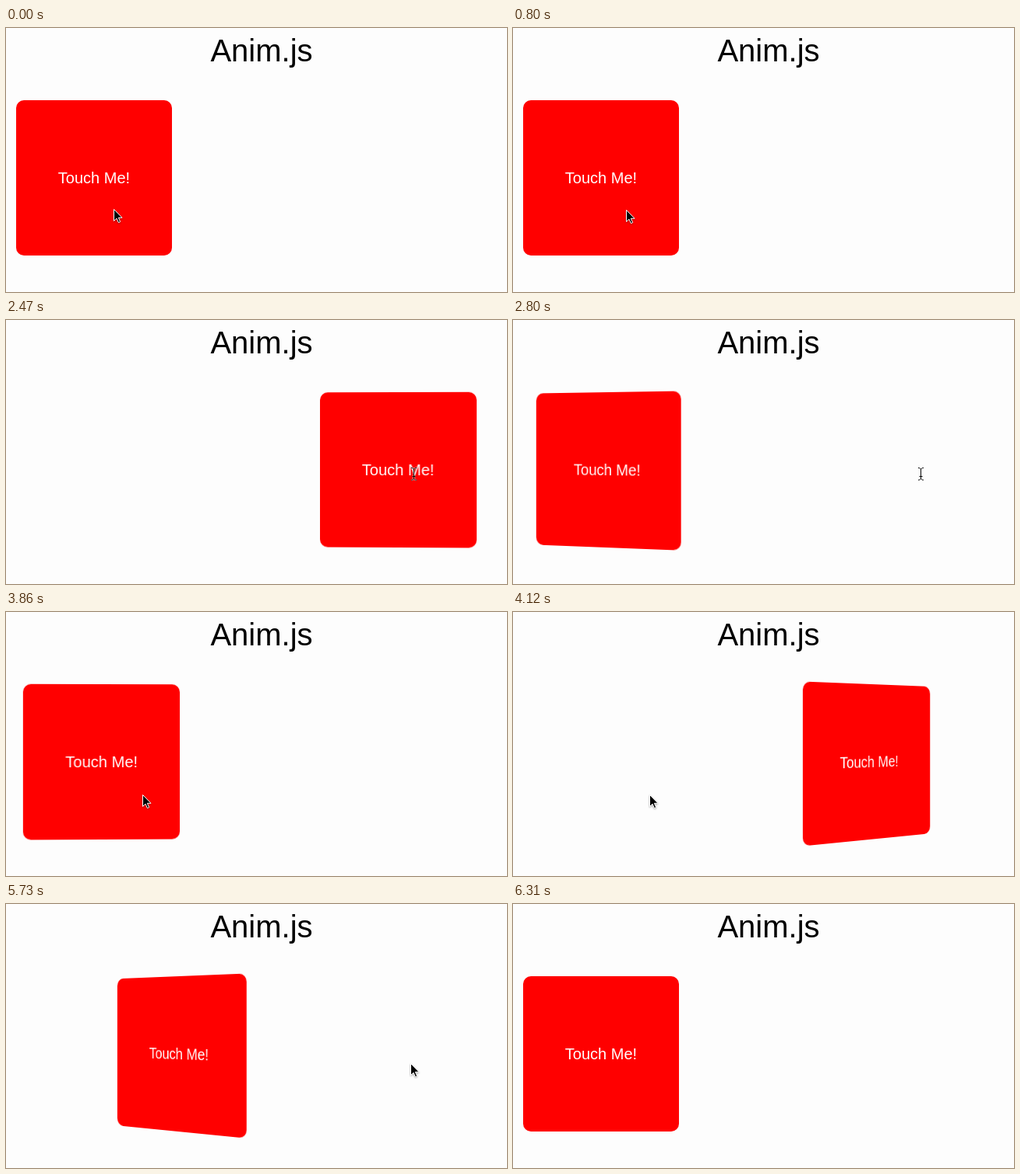
These frames come from a looping animation (643x340 px, 6880 ms). An HTML page:

```html
<!DOCTYPE html>
<html lang="en">
<head>
<meta charset="utf-8">
<title>Anim.js</title>
<style>
  html, body { margin: 0; width: 100%; height: 100%; overflow: hidden; background: #fdfdfd; }
  #stage {
    position: relative; width: 643px; height: 340px; overflow: hidden;
    font-family: "Liberation Sans", Arial, Helvetica, sans-serif;
    perspective: 800px; perspective-origin: 321.5px 150px;
  }
  h1 {
    position: absolute; left: 128px; top: 6px; width: 400px; margin: 0;
    font-size: 40px; font-weight: 400; line-height: 46px; text-align: center; color: #000;
  }
  #box {
    position: absolute; left: 13px; top: 93px; width: 200px; height: 200px;
    border-radius: 10px; background: #f00; color: #fff;
    font-size: 20px; line-height: 200px; text-align: center;
  }
  svg { position: absolute; left: 0; top: 0; pointer-events: none; }
  #arrow { filter: drop-shadow(0 1px 1px rgba(0, 0, 0, .35)); }
</style>
</head>
<body>
<div id="stage">
  <h1>Anim.js</h1>
  <div id="box">Touch Me!</div>
</div>
<svg width="643" height="340" viewBox="0 0 643 340">
  <defs>
    <path id="caret" d="M-3.5-7.5H-2L0-6L2-7.5H3.5M0-6V6.5M-3.5 8H-2L0 6.5L2 8H3.5M-2 3.5H2"/>
  </defs>
  <path id="arrow" d="M.5 .5V15.5L4 12.2L6.4 17.6L8.7 16.6L6.3 11.3H11Z" fill="#000" stroke="#fff"/>
  <g id="beam" fill="none">
    <use href="#caret" stroke="#fff" stroke-opacity=".6" stroke-width="2.2"/>
    <use href="#caret" stroke="#000"/>
  </g>
</svg>
<script>
const LOOP = 6880, TRAVEL = 400, RUN = 660, STEP = 60;
const SLIDE = 430, RISE = 190, FALL = 484, TILT = 33;
const clicks = [1250, 2470, 3860, 5580];
const [box, arrow, beam] = ['box', 'arrow', 'beam'].map(id => document.getElementById(id));

// Pointer: resting place, then moves with start, end and destination
const home = { x: 138, y: 233 };
const moves = [
  { from: 90, to: 290, x: 205, y: 256 },
  { from: 450, to: 950, x: 128, y: 228 },
  { from: 1560, to: 2080, x: 519, y: 190 },
  { from: 2810, to: 3380, x: 175, y: 235 },
  { from: 4300, to: 4830, x: 519, y: 205 },
  { from: 5850, to: 6310, x: 644, y: 340 }
];

const clamp = v => Math.min(1, Math.max(0, v));
const smooth = p => p * p * (3 - 2 * p);
const bezier = (a, b, u) => 3 * a * u * (1 - u) ** 2 + 3 * b * u * u * (1 - u) + u ** 3;

function ease(x) {
  let lo = 0, hi = 1;
  for (let i = 0; i < 24; i++) {
    const mid = (lo + hi) / 2;
    if (bezier(.22, .15, mid) < x) lo = mid; else hi = mid;
  }
  return bezier(.1, 1, lo);
}

// Slide progress and tilt, held between steps, for the time since a click
function slide(age) {
  if (age >= RUN) return [1, 0];
  const t = 15 + Math.max(0, Math.floor((age + 30) / STEP) * STEP - 30);
  const tilt = t < RISE ? (t / RISE) ** 1.23 : (1 - clamp((t - RISE) / FALL)) ** 2.7;
  return [ease(clamp(t / SLIDE)), TILT * tilt];
}

function pointer(t) {
  let { x, y } = home;
  for (const m of moves) {
    const k = smooth(clamp((t - m.from) / (m.to - m.from)));
    x += (m.x - x) * k;
    y += (m.y - y) * k;
  }
  return [Math.round(x), Math.round(y)];
}

function draw(t) {
  const n = clicks.filter(c => c <= t).length;
  const [progress, tilt] = n ? slide(t - clicks[n - 1]) : [1, 0];
  const right = n % 2 === 1;
  const x = TRAVEL * (right ? progress : 1 - progress);
  const turn = tilt ? ` rotateY(${right ? tilt : -tilt}deg)` : '';
  box.style.transform = `translateX(${x}px)${turn}`;

  const [px, py] = pointer(t);
  const overText = t >= 2050 && t < 2860;
  arrow.style.display = overText ? 'none' : '';
  beam.style.display = overText ? '' : 'none';
  arrow.setAttribute('transform', `translate(${px} ${py})`);
  beam.setAttribute('transform', `translate(${px + 4.5} ${py + 8})`);
}

let start;
function tick(now) {
  start ??= now;
  draw((now - start) % LOOP);
  requestAnimationFrame(tick);
}
draw(0);
requestAnimationFrame(tick);
</script>
</body>
</html>
```
